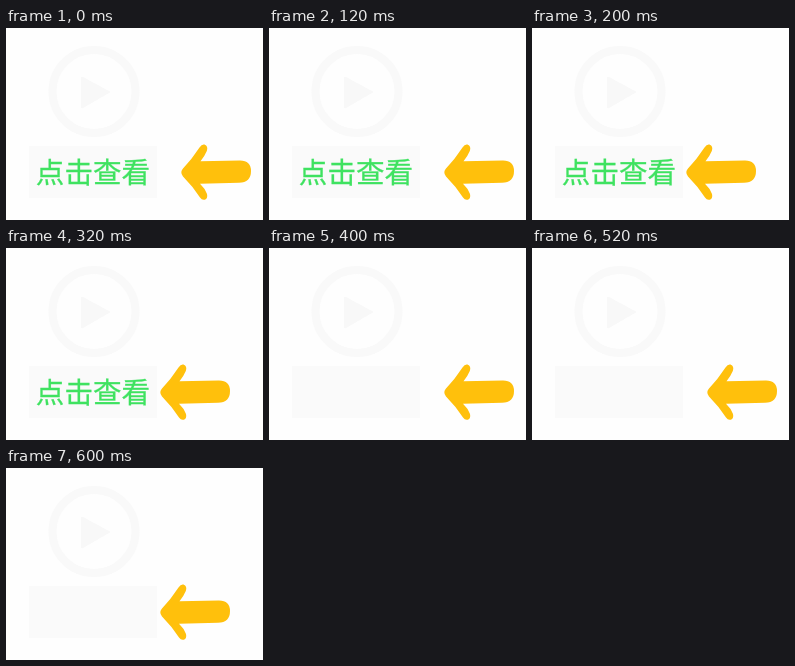
An HTML page for the animation above (800 ms loop, 257 by 192 pixels).

```html
<!DOCTYPE html>
<html lang="zh-CN">
<head>
<meta charset="utf-8">
<title>点击查看</title>
<style>
  html, body { margin: 0; width: 100%; height: 100%; overflow: hidden; background: #fefefe; }
  svg { display: block; width: 100vw; height: 100vh; }
  .label {
    font: 400 28.6px "Noto Sans CJK SC", "Noto Sans CJK", sans-serif;
    fill: #3fe260;
    stroke: #3fe260;
    stroke-width: .3;
    text-anchor: middle;
    animation: blink 800ms step-end infinite;
  }
  .arrow { fill: #ffc00c; animation: nudge 400ms step-end infinite; }
  @keyframes blink { 0% { visibility: visible; } 50%, 100% { visibility: hidden; } }
  @keyframes nudge { 0% { transform: none; } 50%, 100% { transform: translateX(-21px); } }
</style>
</head>
<body>
<svg viewBox="0 0 257 192">
  <circle cx="88" cy="63.5" r="41.5" fill="#fefefe" stroke="#f9f9f9" stroke-width="8"/>
  <path d="M77 49 L103 63 Q105 64 103 65 L77 80 Q75 81 75 79 V50 Q75 48 77 49Z" fill="#f8f8f8"/>
  <rect x="23" y="118" width="128" height="52" fill="#fafafa"/>
  <text class="label" x="87" y="154.6">点击查看</text>
  <path class="arrow" d="M175.3 144 Q175.5 142 177 140.5 Q186 131 193.5 119.5 Q195.8 116 198.5 116.6
    Q202.5 118.5 200.8 123 Q198.5 128.5 194.5 133.3 L234 132.4 Q245 132.4 245 143
    Q245 154.5 233 154.8 L194 155.8 Q199 160.5 201 166 Q202 170.5 198.8 171.7
    Q196 172.5 194 169.5 Q186.5 158 177 148.5 Q175.2 146.5 175.3 144Z"/>
</svg>
</body>
</html>
```
